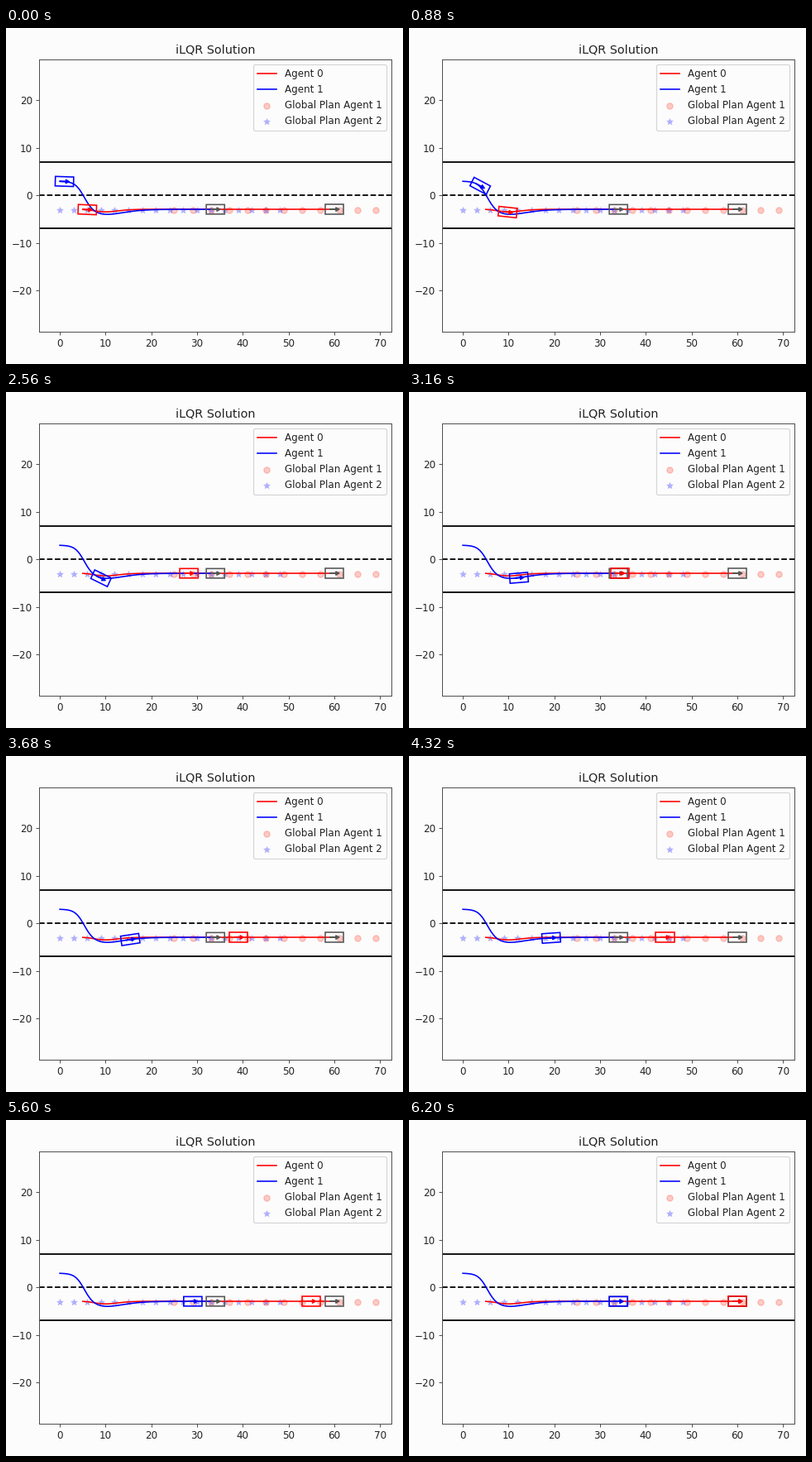
A matplotlib script that plays this animation: 480 px wide and 406 px high, repeating every 6.84 s.

```python
import numpy as np
import matplotlib.pyplot as plt
from matplotlib.animation import FuncAnimation

W, H, DPI = 480, 406, 72  # at 72 dpi one point is one pixel
TICK, FRAMES = 40, 171    # ms per frame, frames per loop
STEP, STEPS = 100, 62     # ms per simulation step, steps per run
PAPER, INK, FRAME_GREY = "#fcfcfc", "#222222", "#4a4a4a"

plt.rcParams.update({
    "font.family": "DejaVu Sans",
    "font.size": 11.87,
    "text.color": INK,
    "axes.titlesize": 14.33,
    "axes.titlepad": 7.2,
    "axes.linewidth": 0.96,
    "axes.edgecolor": FRAME_GREY,
    "lines.linewidth": 1.8,
    "lines.markersize": 7.1,
    "patch.linewidth": 1.2,
    "figure.facecolor": PAPER,
    "axes.facecolor": PAPER,
})
for axis in "xtick", "ytick":
    plt.rcParams.update({
        f"{axis}.major.size": 4.2,
        f"{axis}.major.width": 0.96,
        f"{axis}.major.pad": 3.9,
        f"{axis}.color": FRAME_GREY,
        f"{axis}.labelcolor": INK,
    })


def smooth(x, y):
    """Cubic Hermite curve through a few key points."""
    x, y = np.asarray(x, float), np.asarray(y, float)
    m = np.gradient(y, x)

    def curve(q):
        i = np.clip(np.searchsorted(x, q) - 1, 0, len(x) - 2)
        h = x[i + 1] - x[i]
        t = (q - x[i]) / h
        return ((1 + 2 * t) * (1 - t) ** 2 * y[i] + t * (1 - t) ** 2 * h * m[i]
                + t * t * (3 - 2 * t) * y[i + 1] + t * t * (t - 1) * h * m[i + 1])
    return curve


def dip(x, sharpness):
    """Unit bump that peaks at x = 10 and fades to both sides."""
    u = x / 10
    return (u * np.exp(1 - u)) ** sharpness


def red_path(x):
    return -2.92 - 0.55 * dip(x, 16)


def blue_path(x):
    """Lane change with an overshoot."""
    return -2.93 + 5.93 / (1 + np.exp(x - 5.25)) - 1.1 * dip(x, 8)


# Distance driven at key steps
KEYS = 0, 9, 19, 26, 37, 50, STEPS
red_x = smooth(KEYS, (5, 8.8, 19.8, 27.2, 38.1, 48.8, 59))
blue_x = smooth(KEYS, (0, 2.9, 6, 8.1, 14.4, 23.3, 33))

fig = plt.figure(figsize=(W / DPI, H / DPI), dpi=DPI)
ax = fig.add_axes([40.2 / W, 1 - 367 / H, 426 / W, 329.4 / H])
ax.set_title("iLQR Solution")

for y, style in ((7, "-"), (-7, "-"), (0, "--")):
    ax.axhline(y, color="black", ls=style)


def plan(xs, marker, color, alpha, label):
    return ax.scatter(xs, np.full(len(xs), -3), marker=marker, color=color,
                      alpha=alpha, linewidths=1.5, label=label)


def track(path, x0, x1, color, label):
    xs = np.linspace(x0, x1, 300)
    return ax.plot(xs, path(xs), color=color, lw=1.6, label=label)[0]


handles = [
    track(red_path, 5, 59, "red", "Agent 0"),
    track(blue_path, 0, 33, "blue", "Agent 1"),
    plan(np.arange(25, 70, 4), "o", "#ff5a4a", 0.3, "Global Plan Agent 1"),
    plan(np.arange(0, 49, 3), "*", "blue", 0.2, "Global Plan Agent 2"),
]


class Car:
    """A 4 x 2 box with a heading arrow, anchored one unit behind its centre."""
    CORNERS = np.array([(-1, -1), (3, -1), (3, 1), (-1, 1)])

    def __init__(self, path, color):
        self.path = path
        self.box = ax.add_patch(plt.Polygon(self.CORNERS, fill=False, ec=color,
                                            lw=1.6, zorder=3))
        self.arrow = ax.arrow(0, 0, 1, 0, width=0.1, head_width=0.8,
                              head_length=0.8, color=color, zorder=3)

    def place(self, x):
        y = self.path(x)
        slope = (self.path(x + 0.05) - self.path(x)) / 0.05
        c, s = np.array([1, slope]) / np.hypot(1, slope)
        self.box.set_xy(self.CORNERS @ [(c, s), (-s, c)] + (x, y))
        self.arrow.set_data(x=x, y=y, dx=1.3 * c, dy=1.3 * s)


for path, goal in ((red_path, 59), (blue_path, 33)):
    Car(path, "#555555").place(goal)
red_car, blue_car = Car(red_path, "red"), Car(blue_path, "blue")

ax.set_xlim(-4.5, 72.5)
ax.set_ylim(-28.69, 28.69)
ax.set_xticks(range(0, 71, 10))
ax.set_yticks(range(-20, 21, 10))
ax.legend(handles=handles, loc="upper right", facecolor=PAPER,
          labelspacing=0.49, borderpad=0.44, handlelength=1.92,
          handletextpad=0.85, borderaxespad=0.54)


def update(frame):
    step = min((frame * TICK + 40) // STEP, STEPS)
    red_car.place(red_x(step))
    blue_car.place(blue_x(step))


anim = FuncAnimation(fig, update, frames=FRAMES, interval=TICK,
                     init_func=lambda: update(0), repeat=True, repeat_delay=0)
plt.show()
```
